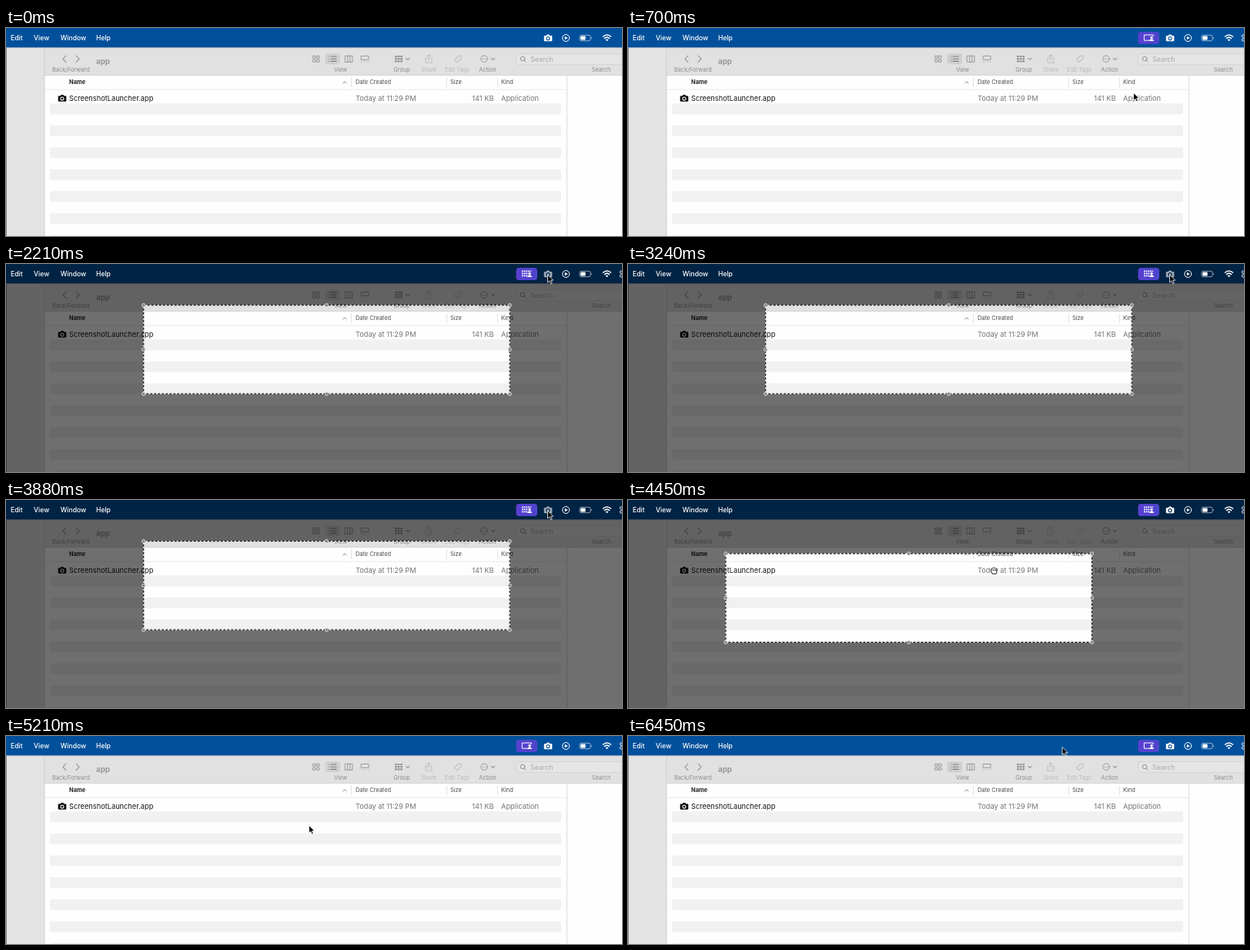
These frames come from a looping animation (800x271 px, 6.58 s). An HTML page:

```html
<!DOCTYPE html>
<html lang="en">
<head>
<meta charset="utf-8">
<title>Screenshot launcher</title>
<style>
  html, body { margin: 0; width: 100%; height: 100%; overflow: hidden; background: #fff; }
  svg { display: block; width: 100vw; height: 100vh; font-family: Inter, "Noto Sans", sans-serif; }
  .small { font-size: 7.4px; }
  .row { font-size: 9.25px; }
  .menu { font-size: 8.6px; font-weight: 500; fill: #fff; }
  .bold { font-weight: 700; }
  .mid { text-anchor: middle; }
  .end { text-anchor: end; }
  .line { fill: none; stroke: #929292; stroke-linecap: round; stroke-linejoin: round; }
  .faint { stroke: #c0c0c0; }
</style>
</head>
<body>
<svg viewBox="0 0 800 271" preserveAspectRatio="none">
  <defs>
    <linearGradient id="violet">
      <stop offset="0" stop-color="#5a3fd2"/><stop offset="1" stop-color="#4d46cc"/>
    </linearGradient>
    <path id="camera" fill-rule="evenodd" d="M-4.2-3H-2.3L-1.4-4.4H1.4L2.3-3H4.2Q5.3-3 5.3-1.9V3.2Q5.3 4.3 4.2 4.3H-4.2Q-5.3 4.3-5.3 3.2V-1.9Q-5.3-3-4.2-3ZM0-2A2.6 2.6 0 1 0 0 3.2A2.6 2.6 0 1 0 0-2ZM0-.9A1.5 1.5 0 1 1 0 2.1A1.5 1.5 0 1 1 0-.9Z"/>
  </defs>

  <rect width="800" height="271" fill="#fefefe"/>
  <rect y="26" width="800" height="36" fill="#e1e1e1"/>
  <rect y="26" width="50" height="245" fill="#e3e3e3"/>
  <rect y="61.4" x="50" width="750" height=".7" fill="#cfcfcf"/>
  <rect x="49.6" y="26" width=".8" height="245" fill="#cbcbcb"/>
  <rect y="26" width="1" height="245" fill="#858585"/>
  <rect x="50" y="79.8" width="678" height=".8" fill="#e4e4e4"/>
  <rect x="728" y="62" width=".9" height="209" fill="#d8d8d8"/>
  <path d="M448.5 65V77M572.3 65V77M638.5 65V77" stroke="#d9d9d9" stroke-width=".8"/>
  <g id="stripes" fill="#f1f1f1"></g>

  <g class="line" stroke-width="1.1">
    <path d="M78 36L74 40.3L78 44.6M91 36L95 40.3L91 44.6"/>
    <path stroke-width=".9" d="M399 36.3h3v3h-3zM404 36.3h3v3h-3zM399 41.3h3v3h-3zM404 41.3h3v3h-3z"/>
    <rect x="414.5" y="33.2" width="19.5" height="14" rx="3" fill="#d0d0d0" stroke="none"/>
    <path d="M422 37H429M422 40.2H429M422 43.4H429M419.5 37h.1M419.5 40.2h.1M419.5 43.4h.1" stroke="#7d7d7d"/>
    <path stroke-width=".9" d="M440.5 36.3h9.5v8h-9.5zM443.7 36.3v8M446.9 36.3v8M461.5 36.5h9.5v4.8h-9.5zM461.8 44h.1M464.8 44h.1M467.8 44h.1M470.8 44h.1"/>
    <path stroke-width="2.2" stroke-linecap="butt" stroke-dasharray="2.8 .8" d="M505 37H515M505 40.2H515M505 43.4H515"/>
    <path d="M519.6 39.4L521.8 41.4L524 39.4M630.3 39.4L632.5 41.4L634.7 39.4"/>
    <circle cx="621" cy="40.2" r="4.3" stroke-width=".9"/>
    <path d="M619 40.2h.1M621 40.2h.1M623 40.2h.1"/>
    <path class="faint" d="M546.8 39H545V45.3H553V39H551.2M549 42V35M546.9 36.9L549 34.8L551.1 36.9"/>
    <path class="faint" d="M582.6 41.2L587.5 36.3L591 36.2L591 39.7L586 44.6Z"/>
  </g>
  <rect x="662.5" y="33.7" width="145" height="14" rx="3.5" fill="#e5e5e5" stroke="#d0d0d0" stroke-width=".8"/>
  <g class="line"><circle cx="671" cy="40" r="2.8"/><path d="M673.2 42.2L675.3 44.3"/></g>
  <text x="681" y="44" font-size="8.9" fill="#aaa">Search</text>
  <text x="117" y="47.2" font-size="9.8" class="bold" fill="#999">app</text>
  <g class="small" fill="#8d8d8d">
    <text x="60" y="57.4">Back/Forward</text>
    <g class="mid">
      <text x="434.5" y="57.4">View</text><text x="514" y="57.4">Group</text>
      <text x="625.5" y="57.4">Action</text><text x="773" y="57.4">Search</text>
      <g fill="#bcbcbc"><text x="549" y="57.4">Share</text><text x="586" y="57.4">Edit Tags</text></g>
    </g>
  </g>
  <g class="small" fill="#4c4c4c">
    <text x="82" y="73.2" class="bold" fill="#222">Name</text>
    <text x="454" y="73.2">Date Created</text><text x="577" y="73.2">Size</text><text x="643" y="73.2">Kind</text>
  </g>
  <path class="line" d="M437.6 72L439.7 69.6L441.8 72"/>
  <use href="#camera" x="73" y="91.5"/>
  <g class="row" fill="#757575">
    <text x="82" y="94.8" fill="#161616">ScreenshotLauncher.app</text>
    <text x="454" y="94.8">Today at 11:29 PM</text>
    <text x="633.5" y="94.8" class="end">141 KB</text>
    <text x="643" y="94.8">Application</text>
  </g>
  <rect width="800" height="25.5" fill="#02509b"/>
  <rect y="25.3" width="800" height=".8" fill="#8fa3b5"/>

  <g id="overlay">
    <path id="dim" fill-rule="evenodd" fill-opacity=".56"/>
    <rect class="frame" width="475.5" height="115.5" fill="none" stroke="#fff"/>
    <rect class="frame" width="475.5" height="115.5" fill="none" stroke="#111" stroke-width="1.2" stroke-dasharray="3 2"/>
    <g id="handles" fill="#858585" stroke="#e8e8e8" stroke-width=".8"></g>
  </g>

  <g class="menu">
    <text x="6" y="16">Edit</text><text x="36" y="16">View</text>
    <text x="70.7" y="16">Window</text><text x="117" y="16">Help</text>
    <use id="shutter" href="#camera" x="704" y="13"/>
    <g fill="none" stroke="#fff">
      <circle cx="727.2" cy="13" r="4.5"/>
      <rect x="745" y="9.3" width="14" height="7.4" rx="2.1" stroke-width=".8" stroke-opacity=".7"/>
      <path d="M775 11.5Q780.5 6.5 786 11.5M777 13.8Q780.5 10.6 784 13.8" stroke-width="1.6"/>
    </g>
    <path d="M725.8 10.7L729.7 13L725.8 15.3ZM778.7 15.2Q780.5 13.6 782.3 15.2L780.5 17.2Z"/>
    <rect x="746.2" y="10.5" width="6.4" height="5" rx="1"/>
    <path d="M760.2 11.6Q761.6 13 760.2 14.4Z"/>
  </g>
  <g id="pill">
    <rect x="662.5" y="5" width="27.5" height="16" rx="3.8" fill="url(#violet)"/>
    <g id="screenIcon" fill="none" stroke="#fff">
      <path d="M677.5 16.2H670.3V9H682.2V11"/>
    </g>
    <path id="gridIcon" d="M670 9.3H682M670 12.3H678M670 15.3H677" fill="none" stroke="#fff" stroke-width="1.8" stroke-dasharray="1.8 .9"/>
    <path d="M677.2 17Q677.4 14.2 680 14.2T682.8 17Z" fill="#fff"/>
    <circle cx="680" cy="12.4" r="1.6" fill="#fff"/>
    <g fill="none" stroke="#fff" stroke-width="1"><rect x="797.3" y="9" width="8" height="3" rx="1.5"/><rect x="797.3" y="14" width="8" height="3" rx="1.5"/></g>
  </g>

  <g id="pointer">
    <path id="arrow" d="M0 0V10L2.3 7.9L4 11.6L5.7 10.8L4.1 7.2H7.2Z" fill="#000" stroke="#fff" stroke-width=".8"/>
    <path id="fist" d="M-3.6 1Q-5-.5-3.8-1.2L-3-.9Q-3.6-3.4-2-3.2Q-1.2-4.4 0-3.5Q1.2-4.2 2-3.1Q3.8-3.4 3.8-1.2Q4 1.6 2.8 4H-2.2Q-2.6 2.4-3.6 1ZM-1-1.8V0M.8-1.8V0M2.4-1.6V0" transform="translate(0 4)" fill="#fff" stroke="#222" stroke-width="1"/>
  </g>
</svg>
<script>
const LOOP = 6580;
const $ = id => document.getElementById(id);
const show = (id, on) => $(id).setAttribute("visibility", on ? "visible" : "hidden");
const clamp = v => Math.max(0, Math.min(1, v));
const smooth = u => u * u * (3 - 2 * u);

for (let i = 0; i < 7; i++)
  $("stripes").innerHTML += `<rect x="57" y="${98.2 + i * 28.6}" width="664" height="14.2" rx="3"/>`;

const W = 475.5, H = 115.5;
for (let i = 0; i < 9; i++)
  if (i !== 4)
    $("handles").innerHTML += `<circle cx="${i % 3 * W / 2}" cy="${(i / 3 | 0) * H / 2}" r="2.2"/>`;

// Pointer moves: start, end, target x, target y
const moves = [
  [150, 850, 664, 62],
  [850, 1400, 703.5, 14],
  [4030, 4650, 402, 112],
  [4700, 4940, 393.5, 116.5],
  [5700, 6400, 564, 14.5],
];

function pointerAt(t) {
  let x = 600, y = 254;
  for (const [from, to, tx, ty] of moves) {
    const k = smooth(clamp((t - from) / (to - from)));
    x += (tx - x) * k;
    y += (ty - y) * k;
  }
  return [x, y];
}

function draw(t) {
  const [x, y] = pointerAt(t);
  const selecting = t >= 1610 && t < 5210;
  const held = t >= 4030 && selecting && x < 527;

  // The selection follows the pointer once it is grabbed
  const dx = held ? x - 527 : 0;
  const sx = 178.7 + dx, sy = 53.7 - dx * .313;
  $("dim").setAttribute("d", `M0 0H800V271H0ZM${sx} ${sy}h${W}v${H}h${-W}Z`);
  for (const f of document.querySelectorAll(".frame")) {
    f.setAttribute("x", sx);
    f.setAttribute("y", sy);
  }
  $("handles").setAttribute("transform", `translate(${sx} ${sy})`);
  $("overlay").setAttribute("opacity", selecting ? smooth(clamp((t - 1580) / 450)) : 0);
  $("shutter").setAttribute("opacity", t >= 1610 && t < 4030 ? .6 : 1);

  const grid = t >= 2030 && selecting;
  show("pill", t >= 450);
  show("screenIcon", t >= 450 && !grid);
  show("gridIcon", grid);
  show("arrow", t >= 150 && !held);
  show("fist", held);
  $("pointer").setAttribute("transform", `translate(${x} ${y})`);
}

function tick() {
  draw(performance.now() % LOOP);
  requestAnimationFrame(tick);
}
tick();
</script>
</body>
</html>
```
